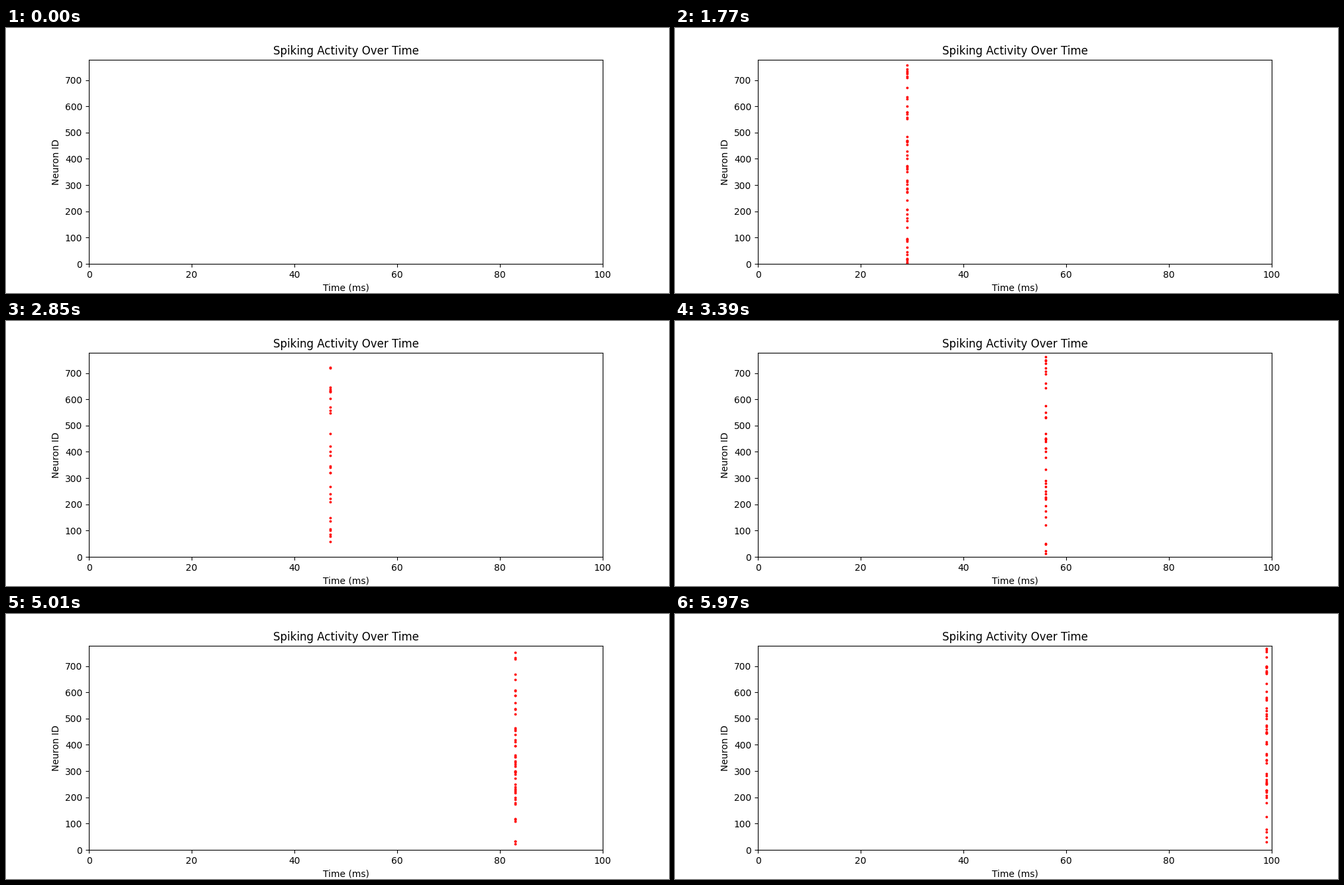
A matplotlib script for the animation above (6030 ms loop, 1000 px wide and 400 px high).

```python
import numpy as np
import matplotlib.pyplot as plt
from matplotlib.animation import FuncAnimation

INTERVAL = 30          # ms per frame; the simulation advances every second one
FRAMES = 201
DURATION = 100         # simulated ms
FIRST_SPIKE = 5
MAX_ID = 767


def spikes_at(step):
    """Return the (time, neuron) points firing at one time step."""
    if step < FIRST_SPIKE:
        return np.empty((0, 2))
    rng = np.random.default_rng(step)
    neurons = rng.choice(MAX_ID + 1, rng.integers(28, 58), replace=False)
    return np.column_stack([np.full(len(neurons), step), neurons])


fig, ax = plt.subplots(figsize=(10, 4), dpi=100)
ax.set_xlim(0, DURATION)
ax.set_ylim(0, MAX_ID + 10)
ax.set_title("Spiking Activity Over Time")
ax.set_xlabel("Time (ms)")
ax.set_ylabel("Neuron ID")
dots = ax.scatter([], [], s=3, c="red")


def update(frame):
    dots.set_offsets(spikes_at((frame - 1) // 2))
    return (dots,)


anim = FuncAnimation(fig, update, frames=FRAMES, interval=INTERVAL,
                     repeat=True, repeat_delay=0)
plt.show()
```
